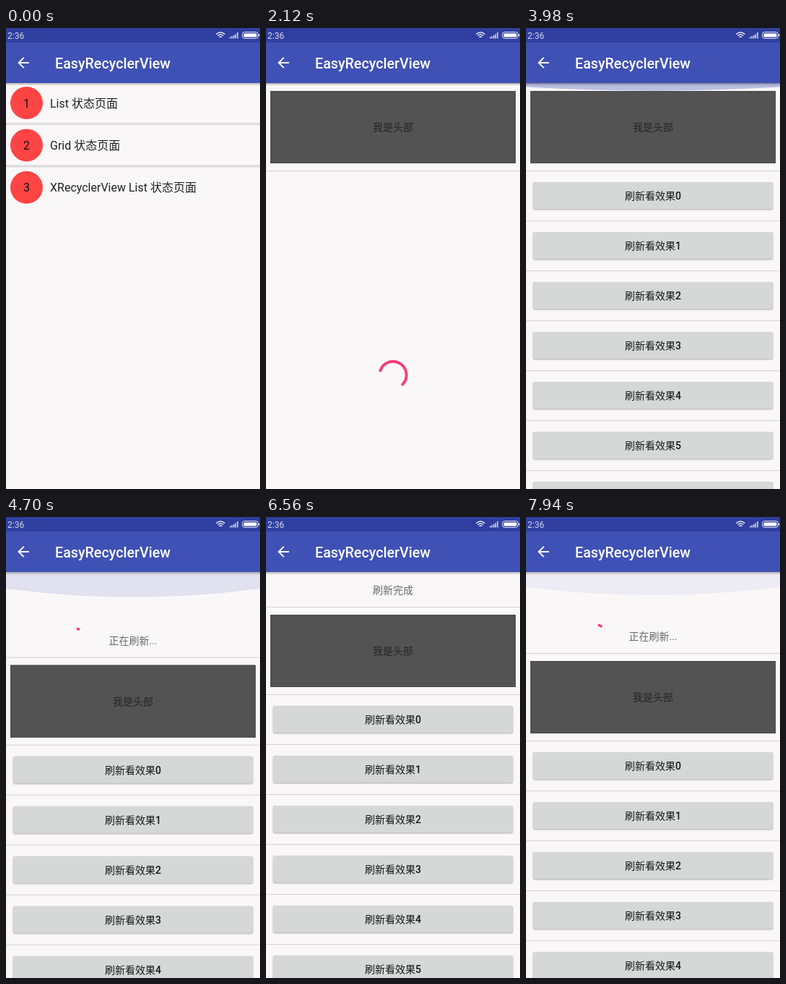
These frames come from a looping animation (352 by 637 pixels, 8000 ms). An HTML page:

```html
<!DOCTYPE html>
<html lang="zh-CN">
<head>
<meta charset="utf-8">
<title>Pull to refresh</title>
<style>
html, body { margin: 0; width: 100%; height: 100%; overflow: hidden; background: #faf7f8; }
svg { display: block; width: 352px; height: 637px; }
text { font-family: Roboto, "Noto Sans CJK SC", "Noto Sans CJK", sans-serif; font-size: 14px; fill: #161616; }
.mid { text-anchor: middle; }
.title { font-size: 19.7px; font-weight: 500; fill: #fff; }
.item { font-size: 16px; fill: #212121; }
.digit { font-weight: 500; }
.button { fill: #d6d7d7; filter: drop-shadow(0 1px 1px rgba(0, 0, 0, .32)); }
.spin { fill: none; stroke: #f73d78; stroke-linecap: square; }
</style>
</head>
<body>
<svg viewBox="0 0 352 637">
  <defs>
    <linearGradient id="shade" x1="0" y1="0" x2="0" y2="1">
      <stop offset="0" stop-color="#000" stop-opacity=".27"/>
      <stop offset="1" stop-color="#000" stop-opacity="0"/>
    </linearGradient>
    <g id="bar">
      <rect y="76" width="352" height="4" fill="url(#shade)"/>
      <rect y="20" width="352" height="56" fill="#3f51b5"/>
      <path transform="translate(12.3 36.3) scale(.978)" fill="#fff"
        d="M20 11H7.83l5.59-5.59L12 4l-8 8 8 8 1.41-1.41L7.83 13H20z"/>
      <text class="title" x="68" y="55.5">EasyRecyclerView</text>
    </g>
  </defs>

  <g id="menu">
    <rect width="352" height="637" fill="#faf7f8"/>
    <g id="entries"></g>
    <use href="#bar"/>
  </g>

  <g id="page">
    <rect width="352" height="637" fill="#faf7f8"/>
    <g id="list">
      <path id="turn" class="spin" stroke-width="3.3"/>
      <text id="hint" class="mid" x="176" y="58" style="fill:#6a6a6a"></text>
      <rect y="76" width="352" height="1" fill="#d5d3d4"/>
      <rect x="6" y="87" width="340" height="100" fill="#535353"/>
      <rect x="6.5" y="87.5" width="339" height="99" fill="none" stroke="#464646"/>
      <text class="mid" x="176" y="142.3" style="fill:#262626">我是头部</text>
      <rect y="197" width="352" height="1" fill="#d5d3d4"/>
      <g id="lines"></g>
      <g id="rows"></g>
    </g>
    <path id="load" class="spin" stroke-width="3.9"/>
    <path id="glow" fill="#3f51b5"/>
    <use href="#bar"/>
  </g>

  <rect width="352" height="20" fill="#303f9f"/>
  <text x="2" y="14.5" style="font-size:12px;fill:#d3d8ef">2:36</text>
  <g fill="none" stroke="#e8eaf6" stroke-width="1.4">
    <path d="M291.3 8.6Q297.3 3.4 303.3 8.6M293.4 10.8Q297.3 7.4 301.2 10.8M295.4 12.7Q297.3 11.1 299.2 12.7"/>
    <path d="M310.7 14.5v-2M313.2 14.5v-3.2M315.7 14.5v-4.6M318.2 14.5v-6M320.9 14.5v-8.5"/>
    <rect x="327.6" y="5.7" width="21.6" height="8.6" rx="3" stroke-width="1"/>
    <path d="M350.6 8.5v3"/>
    <rect x="329.4" y="7.4" width="18" height="5.2" rx="1.6" fill="#fff" stroke="none"/>
  </g>
</svg>

<script>
const LOOP = 8000, STEP = 60, FIRST = 500;
const SETTLED = 48;
const el = id => document.getElementById(id);
const [menu, page, list, rows, lines, turn, load, hint, glow] =
  ['menu', 'page', 'list', 'rows', 'lines', 'turn', 'load', 'hint', 'glow'].map(el);

el('entries').innerHTML = ['List', 'Grid', 'XRecyclerView List'].map((name, i) => {
  const y = 103.5 + i * 58.4;
  const rule = i < 2 ? `<rect y="${y + 27.3}" width="352" height="3.4" fill="#dedede"/>` : '';
  return `<circle cx="28.5" cy="${y}" r="22.5" fill="#ff4444"/>
    <text class="item mid" x="28.5" y="${y + 6}" style="fill:#111">${i + 1}</text>
    <text class="item" x="61" y="${y + 6}">${name} 状态页面</text>${rule}`;
}).join('');

for (let i = 0; i < 12; i++) {
  const y = 213 + i * 69;
  lines.innerHTML += `<rect y="${y + 53}" width="352" height="1" fill="#d5d3d4"/>`;
  rows.innerHTML += `<rect class="button" x="10" y="${y}" width="332" height="37" rx="2"/>
    <text class="mid" x="176" y="${y + 24.3}">刷新看效果<tspan class="digit">${i}</tspan></text>`;
}

const clamp = x => Math.min(1, Math.max(0, x));
const smooth = x => (1 - Math.cos(Math.PI * clamp(x))) / 2;
const show = (node, on) => node.setAttribute('visibility', on ? 'visible' : 'hidden');
const move = (node, x, y) => node.setAttribute('transform', `translate(${x} ${y})`);

// Linear interpolation through [time, ...values] rows
function track(keys, t) {
  if (t <= keys[0][0]) return keys[0].slice(1);
  for (let i = 1; i < keys.length; i++) {
    const a = keys[i - 1], b = keys[i];
    if (t <= b[0]) {
      const p = (t - a[0]) / (b[0] - a[0]);
      return a.slice(1).map((v, k) => v + (b[k + 1] - v) * p);
    }
  }
  return keys[keys.length - 1].slice(1);
}

// cubic-bezier(.4, 0, .2, 1)
function swing(x) {
  x = clamp(x);
  let lo = 0, hi = 1, s;
  for (let i = 0; i < 24; i++) {
    s = (lo + hi) / 2;
    const bx = 1.2 * s * (1 - s) ** 2 + .6 * s * s * (1 - s) + s ** 3;
    if (bx < x) lo = s; else hi = s;
  }
  return s * s * (3 - 2 * s);
}

// Arc that grows, then shrinks, while the whole ring rotates
function spin(node, t, cx, cy, r) {
  const p = (t % 1333) / 1333;
  const base = p / 4 + t / 2222;
  const from = base + .75 * swing(p * 2 - 1);
  const to = Math.max(base + .75 * swing(p * 2), from + .003);
  const point = turns => {
    const a = turns * 2 * Math.PI;
    return `${cx + r * Math.sin(a)} ${cy - r * Math.cos(a)}`;
  };
  node.setAttribute('d', `M${point(from)}A${r} ${r} 0 ${to - from > .5 ? 1 : 0} 1 ${point(to)}`);
}

const DRAG = [[3140, 0], [3200, -27.4], [3320, -140], [3440, -215], [3560, -225], [3740, -110],
  [3860, -25], [3920, 0], [4040, 0], [4340, 70], [4640, 125]];
const PULL = [[7700, 0], [7760, 35], [7820, 90], [7855, 126.6]];
const GLOW = [[3900, 0, 0], [3980, 5.5, .35], [4340, 18, .25], [4640, 26, .18], [4880, 14, 0],
  [7730, 0, 0], [7760, 10, .15], [7855, 27, .13], [7940, 21, .065], [8000, 17, .03]];

function offset(t) {
  const settle = (from, to, start) => from + (to - from) * smooth((t - start) / 300);
  if (t < 4640) return track(DRAG, t)[0];
  if (t < 6740) return settle(125, SETTLED, 4640);
  if (t < 7100) return settle(SETTLED, 0, 6740);
  if (t < 7855) return track(PULL, t)[0];
  return settle(126.6, SETTLED, 7855);
}

function draw(time) {
  const t = time < FIRST ? 0 : FIRST + Math.floor((time - FIRST) / STEP) * STEP;

  const left = t < FIRST ? 1 : (1 - clamp((t - 438) / 300)) ** 3;
  move(menu, -88 * (1 - left), 0);
  move(page, 352 * left, 0);

  const loading = t >= FIRST && t < 2180;
  show(load, loading);
  if (loading) spin(load, t - 465, 176, 479.5, 18.6);
  show(lines, t >= 2180);
  rows.setAttribute('opacity', smooth((t - 2140) / 270));

  const y = offset(t);
  move(list, 0, y);
  const start = t >= 7855 ? 7855 : 4644;
  const busy = t >= 7855 || (t >= start && t < 6560);
  show(turn, busy);
  if (busy) spin(turn, t - start, 96, 52, 15.4);
  hint.textContent = busy ? '正在刷新...'
    : t >= 6560 && t < 7100 ? '刷新完成'
    : y > SETTLED ? '释放立即刷新' : '下拉刷新';

  const [depth, alpha] = track(GLOW, t);
  const edge = 76 + depth, dip = edge + 2 * (3 + .38 * depth);
  glow.setAttribute('d', `M0 76V${edge}Q176 ${dip} 352 ${edge}V76Z`);
  glow.setAttribute('opacity', alpha);
}

const origin = performance.now();
function tick() {
  draw((performance.now() - origin) % LOOP);
  requestAnimationFrame(tick);
}
tick();
</script>
</body>
</html>
```
